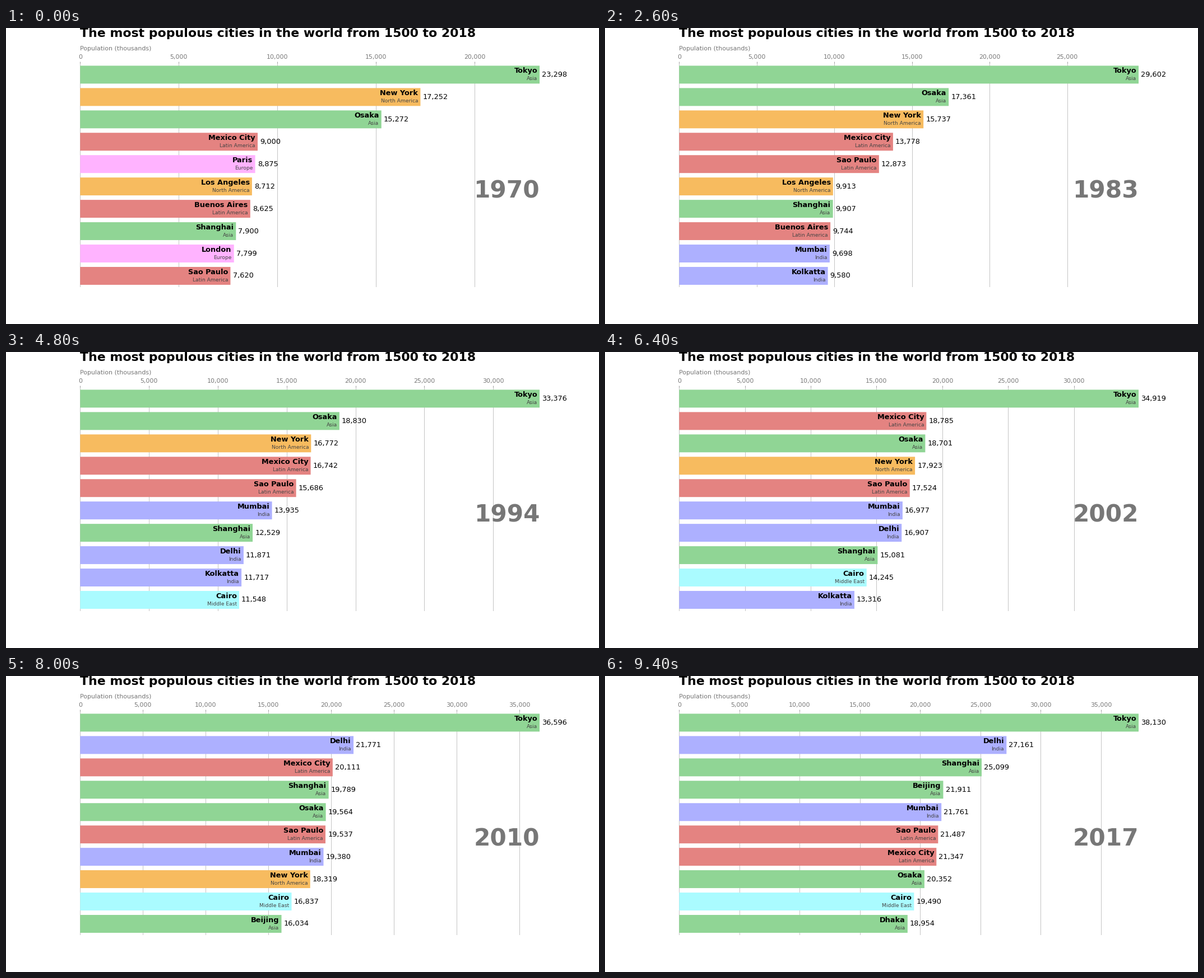
Recreate the animation shown at these times as a matplotlib script. Size 1058 px wide and 529 px high, loop 9600 ms.

```python
import matplotlib.pyplot as plt
import numpy as np
from matplotlib.animation import FuncAnimation
from matplotlib.ticker import MultipleLocator, StrMethodFormatter

FIRST_YEAR, LAST_YEAR = 1970, 2017
STEP_MS = 200
TOP = 10
GREY = "#777777"

COLORS = {
    "India": "#adb0ff",
    "Europe": "#ffb3ff",
    "Asia": "#90d595",
    "Latin America": "#e48381",
    "Middle East": "#aafbff",
    "North America": "#f7bb5f",
}

# Populations (thousands) in consecutive census years, from the first one named.
CENSUS = [1970, 1976, 1983, 1994, 2002, 2017]
CITIES = {
    "Tokyo": ("Asia", 1970, [23298, 27002, 29602, 33376, 34919, 38130]),
    "Osaka": ("Asia", 1970, [15272, 16444, 17361, 18830, 18701, 20352]),
    "Shanghai": ("Asia", 1970, [7900, 8238, 9907, 12529, 15081, 25099]),
    "New York": ("North America", 1970, [17252, 16800, 15737, 16772, 17923, 18673]),
    "Mexico City": ("Latin America", 1970, [9000, 11646, 13778, 16742, 18785, 21347]),
    "Sao Paulo": ("Latin America", 1970, [7620, 10109, 12873, 15686, 17524, 21487]),
    "Buenos Aires": ("Latin America", 1970, [8625, 8880, 9744, 11217]),
    "Los Angeles": ("North America", 1970, [8712, 9043, 9913, 11248]),
    "Rio de Janeiro": ("Latin America", 1970, [6791, 8397, 8966]),
    "Paris": ("Europe", 1970, [8875, 9254, 8841]),
    "London": ("Europe", 1970, [7799, 7569]),
    "Mumbai": ("India", 1976, [7397, 9698, 13935, 16977, 21761]),
    "Kolkatta": ("India", 1976, [8116, 9580, 11717, 13316, 15098]),
    "Delhi": ("India", 1994, [11871, 16907, 27161]),
    "Cairo": ("Middle East", 1994, [11548, 14245, 19490]),
    "Beijing": ("Asia", 2002, [11222, 21911]),
    "Dhaka": ("Asia", 2002, [11103, 18954]),
}

plt.rcParams["font.family"] = "DejaVu Sans"
fig = plt.figure(figsize=(16, 8), dpi=66.125, facecolor="white")
ax = fig.add_axes([0.125, 0.125, 0.775, 0.755])


def population(city, year):
    """Steady percentage growth between census years, zero outside them."""
    _, start, counts = CITIES[city]
    first = CENSUS.index(start)
    years = CENSUS[first:first + len(counts)]
    if not years[0] <= year <= years[-1]:
        return 0
    return np.exp(np.interp(year, years, np.log(counts)))


def ranking(year):
    """The largest cities of a year, smallest first."""
    return sorted((population(city, year), city) for city in CITIES)[-TOP:]


def draw_bar(row, value, city, gap):
    region = CITIES[city][0]
    ax.barh(row, value, color=COLORS[region], snap=False)
    ax.text(value - gap, row, city, size=14, weight=600, ha="right", va="bottom")
    ax.text(value - gap, row - 0.25, region, size=10, color="#444444",
            ha="right", va="baseline")
    ax.text(value + gap, row, f"{value:,.0f}", size=14, ha="left", va="center")


def style_axes():
    ax.set_frame_on(False)
    ax.set_yticks([])
    ax.margins(0, 0.01)
    ax.xaxis.set_major_locator(MultipleLocator(5000))
    ax.xaxis.set_major_formatter(StrMethodFormatter("{x:,.0f}"))
    ax.xaxis.set_ticks_position("top")
    ax.tick_params(axis="x", colors=GREY, labelsize=12)
    ax.grid(which="major", axis="x", linestyle="-", color="#b0b0b0", linewidth=0.8)
    ax.set_axisbelow(True)


def draw(frame):
    year = FIRST_YEAR + frame
    ranked = ranking(year)
    largest = ranked[-1][0]
    ax.clear()
    for row, (value, city) in enumerate(ranked):
        draw_bar(row, value, city, largest / 200)
    style_axes()
    ax.set_xlim(0, largest)

    place = dict(transform=ax.transAxes)
    ax.text(1, 0.4, year, color=GREY, size=46, ha="right", weight=800, **place)
    ax.text(0, 1.06, "Population (thousands)", size=12, color=GREY, **place)
    ax.text(0, 1.12, "The most populous cities in the world from 1500 to 2018",
            size=24, weight=600, ha="left", **place)
    return []


anim = FuncAnimation(fig, draw, frames=LAST_YEAR - FIRST_YEAR + 1,
                     init_func=lambda: draw(0), interval=STEP_MS,
                     repeat=True, repeat_delay=0)
plt.show()
```
